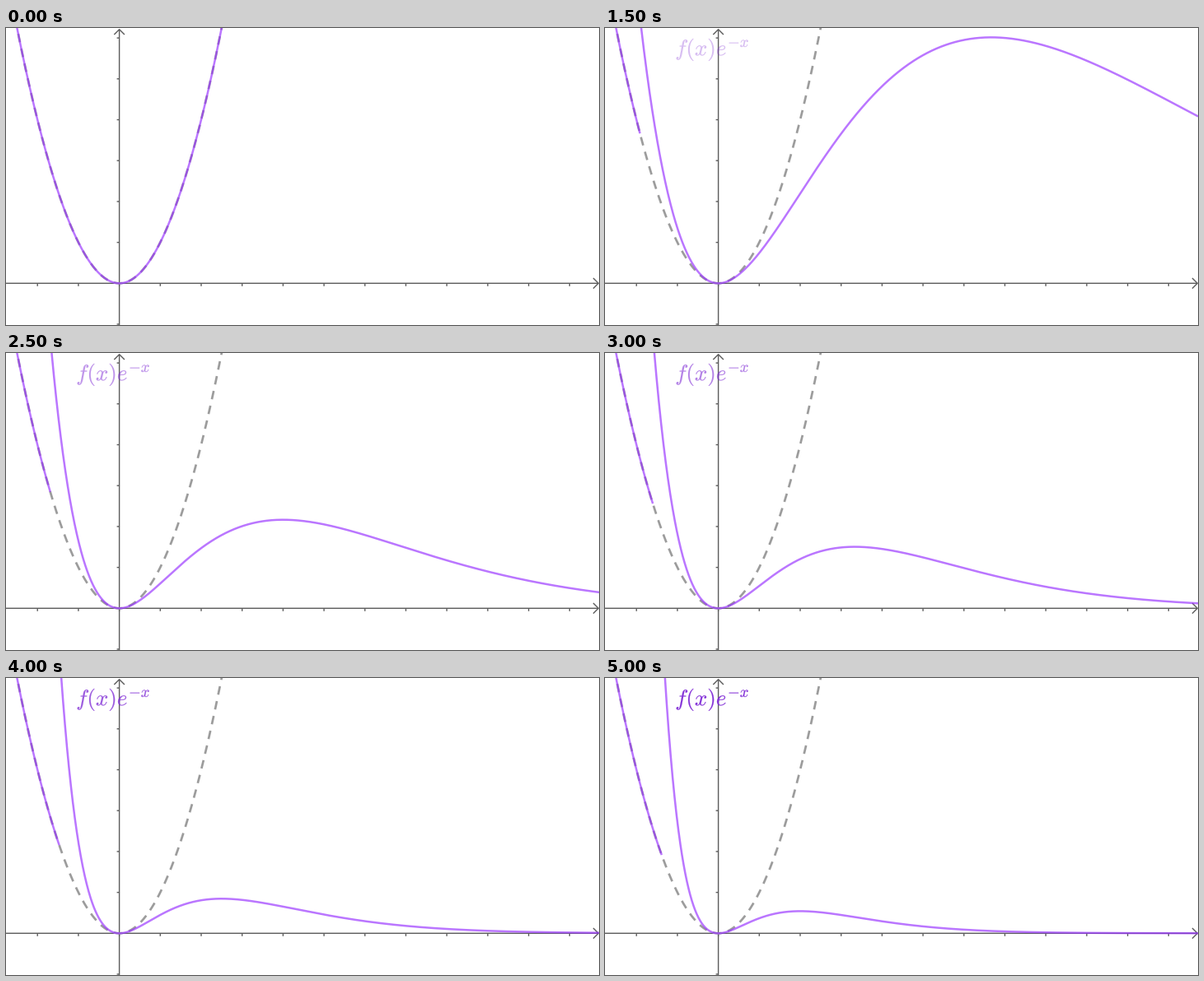
Recreate the animation shown at these times as a matplotlib script. Size 720x361 px, loop 5500 ms.

```python
import numpy as np
import matplotlib.pyplot as plt
from matplotlib.animation import FuncAnimation
from matplotlib.patches import PathPatch
from matplotlib.textpath import TextPath
from matplotlib.transforms import Affine2D

W, H, DPI = 720, 361, 64
PT = 72 / DPI                # points per pixel
OX, OY, UNIT = 137.6, 310.3, 49.7
STEPS = 11
PURPLE, TEXT = "#9933ff", "#8432d8"

plt.rcParams["mathtext.fontset"] = "cm"
fig = plt.figure(figsize=(W / DPI, H / DPI), dpi=DPI, facecolor="white")
ax = fig.add_axes([0, 0, 1, 1])
ax.set_xlim(0, W)
ax.set_ylim(H, 0)
ax.axis("off")


def to_px(x, y):
    return OX + UNIT * x, OY - UNIT * y


def stroke(xs, ys, width, color, **kw):
    kw.setdefault("solid_capstyle", "butt")
    return ax.plot(xs, ys, color=color, lw=width * PT, snap=False, **kw)[0]


def draw_axes():
    ink = dict(width=1.4, color="#5c5c5c", zorder=1)
    stroke([0, W - 1], [OY, OY], **ink)
    stroke([OX, OX], [2, H], **ink)
    stroke([W - 7, W - 0.7, W - 7], [OY - 6.3, OY, OY + 6.3], **ink)
    stroke([OX - 6.3, OX, OX + 6.3], [8, 1.7, 8], **ink)
    for i in range(-2, 12):
        x = OX + i * UNIT
        stroke([x, x], [OY, OY + 3.5], **ink)
    for j in range(-1, 7):
        y = OY - j * UNIT
        stroke([OX - 3, OX], [y, y], **ink)


def draw_dashes(width, on, off, phase):
    x = np.linspace(-2.5, 2.5, 400)
    pattern = (phase / width, (on / width, off / width))
    stroke(*to_px(x, x**2), width, "#9c9c9c", zorder=2,
           linestyle=pattern, dash_capstyle="butt")


def formula(x, y, size):
    path = TextPath((0, 0), r"$f(x)e^{-x}$", size=size)
    path = Affine2D().scale(1, -1).translate(x, y).transform_path(path)
    return ax.add_patch(PathPatch(path, fc=TEXT, ec=TEXT, lw=0.25, zorder=5))


def damped(x, k):
    return x**2 * np.exp(-k * x)


xs = np.linspace(-2.6, 11.8, 1800)
left = np.linspace(-2.5, 0, 2500)
top = OY / UNIT

draw_axes()
draw_dashes(2.7, 10.4, 8, 10.8)
trace = stroke([], [], 2.5, PURPLE, alpha=0.67, zorder=3)
curve = stroke([], [], 2.5, PURPLE, alpha=0.67, zorder=4)
label = formula(85.2, 33.2, 27)


def update(i):
    k = i / (STEPS - 1)
    curve.set_data(*to_px(xs, damped(xs, k)))
    label.set_alpha(k)
    if i == 0:
        trace.set_data([], [])
    else:
        # the undamped branch shows up to just before the curve enters the view
        entry = left[damped(left, k) > top].max()
        end = entry - (1.5 + 2.5 * k**4) / UNIT
        part = np.linspace(-2.6, end, 120)
        trace.set_data(*to_px(part, part**2))
    return curve, trace, label


anim = FuncAnimation(fig, update, frames=STEPS, interval=500,
                     repeat=True, repeat_delay=0, blit=False)
plt.show()
```
